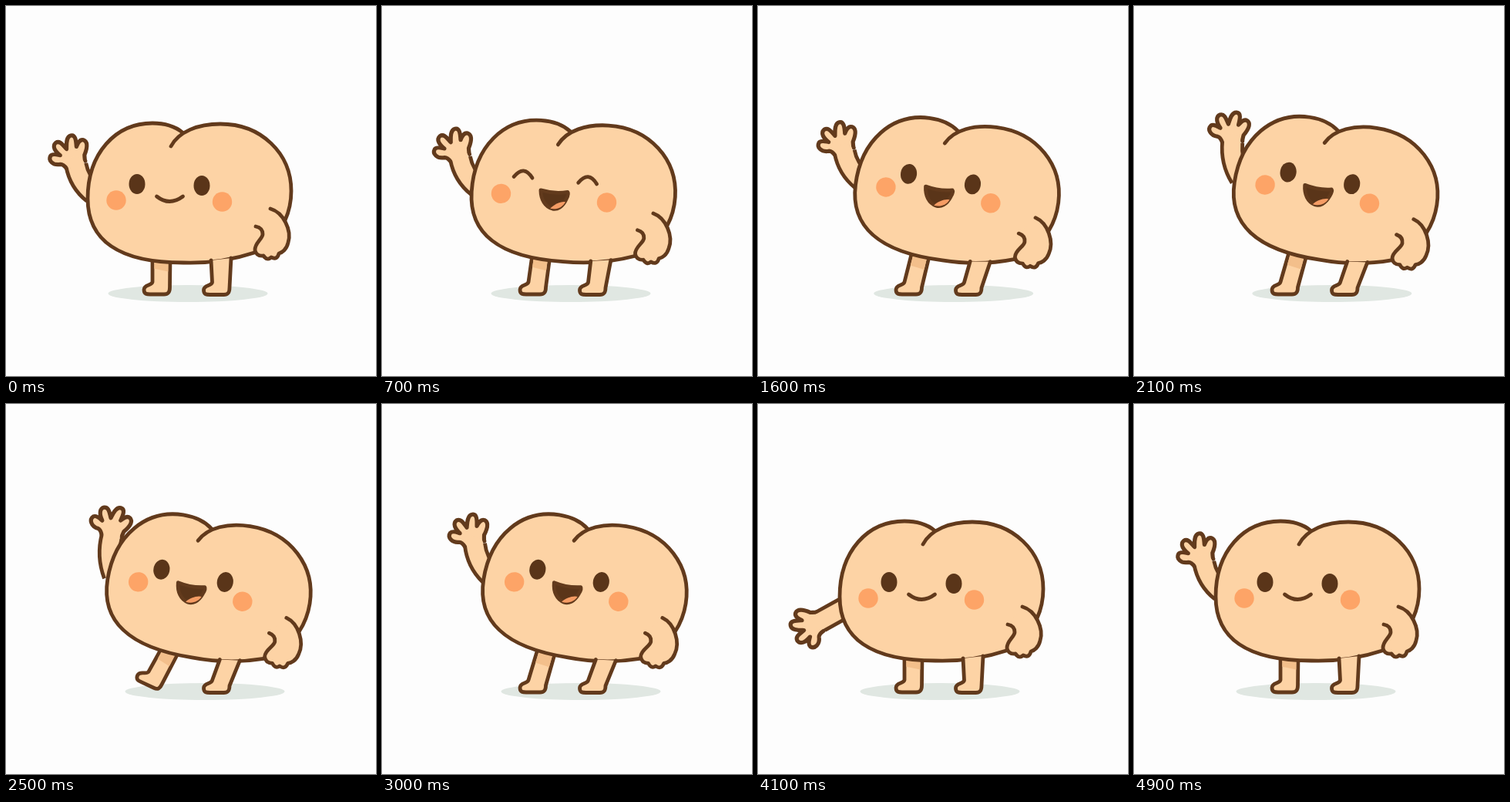
An HTML page that plays this animation: 480 px wide and 480 px high, repeating every 5000 ms.

```html
<!DOCTYPE html>
<html lang="en">
<head>
<meta charset="utf-8">
<title>Waving character</title>
<style>
  html, body { margin: 0; width: 100%; height: 100%; overflow: hidden; background: #fdfdfd; }
  svg { display: block; width: 100%; height: 100%; }
  .skin { fill: #fdd3a5; }
  .line { stroke: #623a1c; stroke-width: 4.8; stroke-linecap: round; stroke-linejoin: round; }
  .bare { fill: none; }
  .dark { fill: #5a3519; }
  .cheek { fill: #fda467; }
</style>
</head>
<body>
<svg viewBox="0 0 480 480">
  <ellipse id="shadow" cy="373" rx="103.5" ry="11" fill="#e0e7e2"/>

  <path id="armEdge" class="bare" stroke="#623a1c" stroke-width="31"/>
  <path id="hand" class="skin line" d="M-12 0C-13 -4 -14 -7 -17 -8C-26 -10 -29 -18 -24 -22
    C-20 -24 -16 -20 -13 -18C-17 -25 -18 -32 -12 -34C-6 -35 -5 -27 -3 -22
    C-1 -27 2 -36 8 -35C14 -34 11 -26 9 -20C12 -23 16 -27 20 -24
    C25 -19 18 -11 14 -7C13 -4 12 -2 12 0"/>
  <path id="armSkin" class="bare" stroke="#fdd3a5" stroke-width="21.4" stroke-linecap="round"/>

  <path id="backLeg" class="skin line"/>
  <path id="shade" fill="#f3bf8b"/>

  <path id="body" class="skin line" d="M214 182C224 163 249 153 278 153C331 153 370 191 370 240
    C370 254 367 267 362 278C354 299 343 313 322 320C295 329 262 334 230 333
    C145 333 106 303 106 250C106 191 142 152 190 152C206 152 219 156 229 164"/>

  <path id="frontLeg" class="skin line"/>

  <path id="sideArm" class="skin line" d="M343 263C360 268 371 291 366 307C364 316 358 320 354 321
    Q352 330 344 326Q339 331 334 324Q325 325 323 317
    C322 308 333 302 333 296C333 290 329 287 324 286"/>

  <g id="face">
    <circle class="cheek" cx="143" cy="252" r="12.7"/>
    <circle class="cheek" cx="280.5" cy="254" r="12.7"/>
    <g id="openEyes" class="dark">
      <ellipse cx="170" cy="231" rx="10.5" ry="13"/>
      <ellipse cx="254" cy="233" rx="10.5" ry="13"/>
    </g>
    <path id="happyEyes" class="bare line" d="M158 229Q170 212 182 229M242 231Q254 214 266 231"/>
    <path id="smile" class="bare line" d="M195.5 247Q212 260 229.5 247"/>
    <g id="laugh">
      <path class="dark line" d="M194 244Q212 248 229 244Q231 246 228 253
        C224 264 217 268 211 267C201 265 195 256 194 244Z"/>
      <path fill="#f59c64" d="M208 267C212 261 222 256 227 257C224 264 217 268 208 267Z"/>
    </g>
  </g>
</svg>
<script>
const LOOP = 5000, STEP = 100;
const PIVOT = { x: 211.5, y: 253 };
const SHOULDER = { x: 113, y: 243 };
// The arm swings between out and up, turning at these times.
const TURNS = [700, 1250, 1600, 2000, 2250, 2500, 2850, 3400, 3800];
const OUT = -31, UP = -3, DROP = -88;

const $ = id => document.getElementById(id);
const set = (id, name, value) => $(id).setAttribute(name, value);
const show = (id, on) => set(id, "visibility", on ? "visible" : "hidden");
const mix = (a, b, u) => a + (b - a) * u;
const along = (p, q, u) => ({ x: mix(p.x, q.x, u), y: mix(p.y, q.y, u) });
const at = (...points) => points.map(p => `${p.x} ${p.y}`).join(" ");

function ramp(t, from, to) {
  const u = Math.min(1, Math.max(0, (t - from) / (to - from)));
  return u * u * (3 - 2 * u);
}

function turn(x, y, degrees) {
  const r = degrees * Math.PI / 180, c = Math.cos(r), s = Math.sin(r);
  return { x: x * c - y * s, y: x * s + y * c };
}

function leanAt(t) {
  const rise = 1 - (1 - Math.min(1, t / 2500)) ** 1.6;
  return rise * (1 - ramp(t, 3200, 4000));
}

function raiseAt(t) {
  const i = TURNS.findLastIndex(turnTime => turnTime <= t);
  if (i < 0 || i === TURNS.length - 1) return 0;
  const u = ramp(t, TURNS[i], TURNS[i + 1]);
  return i % 2 ? 1 - u : u;
}

// A rigid shift and tilt about the pivot, as an SVG transform and for points.
function pose(dx, dy, tilt) {
  return {
    css: `translate(${dx} ${dy}) rotate(${tilt} ${at(PIVOT)})`,
    point(x, y) {
      const p = turn(x - PIVOT.x, y - PIVOT.y, tilt);
      return { x: PIVOT.x + p.x + dx, y: PIVOT.y + p.y + dy };
    }
  };
}

function drawArm(t, body) {
  const raise = raiseAt(t);
  const droop = ramp(t, 3400, 3950) - ramp(t, 4200, 4750);
  const angle = mix(OUT, UP, raise) + DROP * droop;
  const shoulder = body.point(SHOULDER.x, SHOULDER.y + 21 * droop);
  const reach = turn(0, -43 - 7 * raise + 6 * droop, angle);
  const wrist = { x: shoulder.x + reach.x, y: shoulder.y + reach.y };
  const bow = turn(-8 * (1 - droop), 0, angle);
  const bend = along(wrist, shoulder, .5);
  const arm = `M${at(wrist)}Q${bend.x + bow.x} ${bend.y + bow.y} ${at(shoulder)}`;
  set("armEdge", "d", arm);
  set("armSkin", "d", arm);
  set("hand", "transform", `translate(${at(wrist)}) rotate(${angle + 8}) scale(1.08)`);
}

function legShape(left, right, foot, angle) {
  const p = (x, y) => {
    const q = turn(x, y, angle);
    return { x: foot.x + q.x, y: foot.y + q.y };
  };
  const front = p(-12, -16), heel = p(10.5, -9);
  const sole = `C${at(p(-13, -11), p(-23, -13), p(-23, -6))}`
    + `C${at(p(-23, 0), p(-19, 0), p(-15, 0))}L${at(p(3, 0))}`
    + `C${at(p(9, 0), p(10.5, -3), heel)}`;
  return { front, heel, path: `M${at(left)}L${at(front)}${sole}L${at(right)}` };
}

function drawLegs(t, body) {
  const lift = ramp(t, 2100, 2500) - ramp(t, 2500, 2900);
  const left = body.point(190, 325), right = body.point(213, 325);
  const back = legShape(left, right, { x: 202 - 13 * lift, y: 374 - 7 * lift }, 25 * lift);
  const low = along(left, back.front, .48), lowRight = along(right, back.heel, .49);
  set("backLeg", "d", back.path);
  set("shade", "d", `M${left.x + 2.4} ${left.y}L${low.x + 2.4} ${low.y}`
    + `L${lowRight.x - 2.4} ${lowRight.y}L${right.x - 2.4} ${right.y}Z`);

  const front = legShape(body.point(266, 330), body.point(292, 327), { x: 279.5, y: 374.5 }, 0);
  set("frontLeg", "d", front.path);
}

function draw(t) {
  const lean = leanAt(t);
  const body = pose(24 * lean, -6 * lean, 9 * lean);
  const face = pose(27.5 * lean, -9.5 * lean, 9.8 * lean);
  set("shadow", "cx", 236 + 22 * lean);
  set("body", "transform", body.css);
  set("sideArm", "transform", body.css);
  set("face", "transform", face.css);
  drawArm(t, body);
  drawLegs(t, body);

  const happy = t >= 500 && t < 1200, laughing = t >= 400 && t < 3100;
  show("happyEyes", happy);
  show("openEyes", !happy);
  show("laugh", laughing);
  show("smile", !laughing);
}

const start = performance.now();
function tick() {
  const t = (performance.now() - start) % LOOP;
  draw(Math.floor(t / STEP) * STEP);
  requestAnimationFrame(tick);
}
tick();
</script>
</body>
</html>
```
